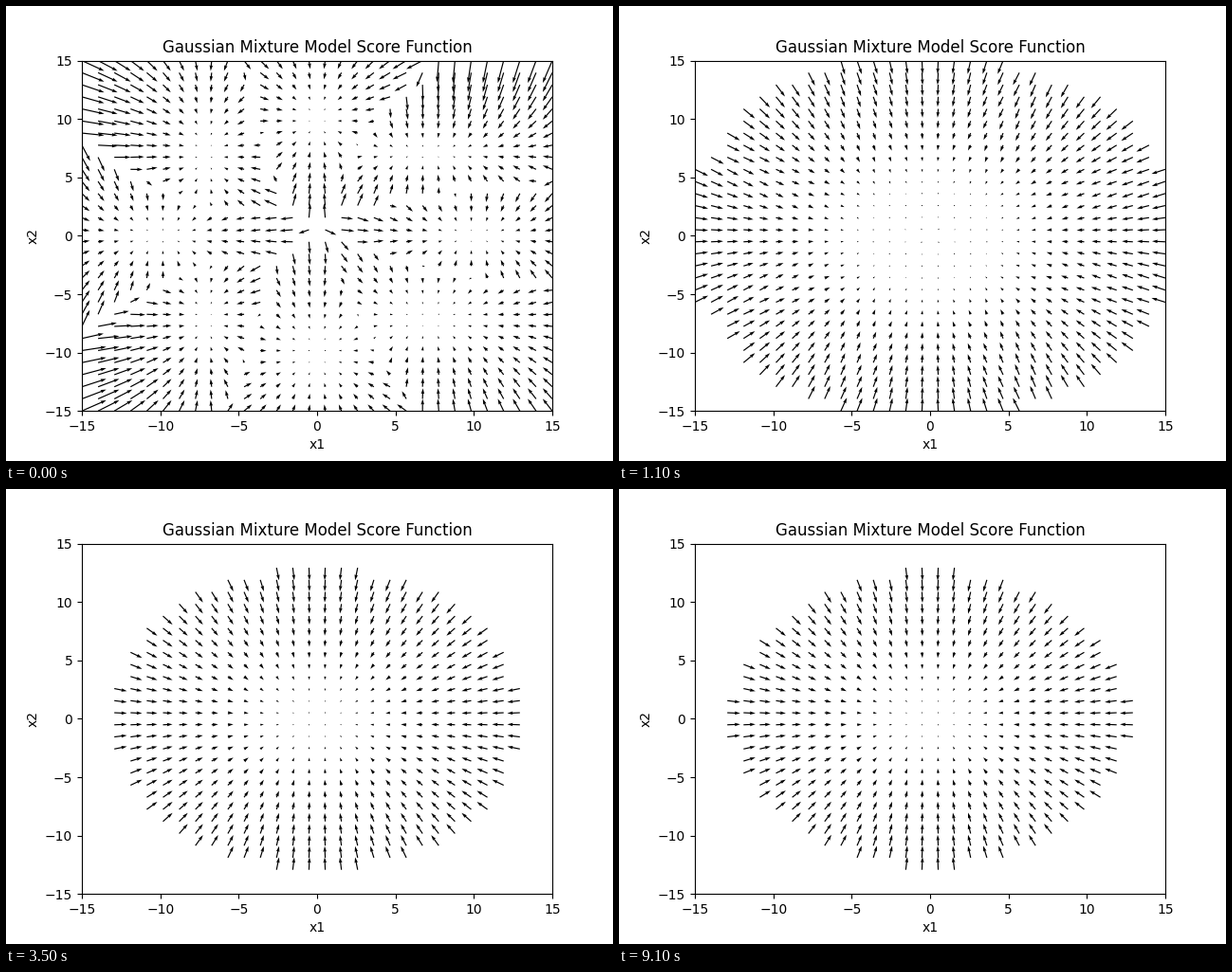
Recreate the animation shown at these times as a matplotlib script. Size 640 by 480 pixels, loop 9200 ms.

```python
import numpy as np
import matplotlib.pyplot as plt
from matplotlib.animation import FuncAnimation

FRAMES, INTERVAL = 92, 100
DECAY = 0.9          # shrink of the means per step
LOG_FLOOR = -88.376  # single-precision exp() underflows below this

# Eight components on a circle, counter-clockwise from the right
angles = np.arange(8) * np.pi / 4
means = 10 * np.column_stack([np.cos(angles), np.sin(angles)])
variances = np.array([
    (1.10, 0.70), (1.40, 0.60), (0.70, 1.00), (0.60, 1.30),
    (1.08, 0.80), (0.55, 1.25), (1.00, 1.30), (1.40, 1.10),
])

axis = np.linspace(-15, 15, 30)
X, Y = np.meshgrid(axis, axis)
points = np.stack([X, Y], axis=-1)[:, :, None, :]


def score(step):
    """Gradient of the log density after `step` noising steps."""
    a = DECAY ** step
    var = a * a * variances + 1 - a * a
    diff = points - a * means
    log_pdf = (-0.5 * (diff ** 2 / var).sum(-1)
               - np.log(2 * np.pi) - 0.5 * np.log(var.prod(-1)))
    pdf = np.where(log_pdf > LOG_FLOOR, np.exp(log_pdf), 0.0)
    total = pdf.sum(-1)
    grad = -(pdf[..., None] * diff / var).sum(2)
    with np.errstate(invalid="ignore", divide="ignore"):
        return grad / total[..., None]


fig, ax = plt.subplots(figsize=(6.4, 4.8), dpi=100)
ax.set_title("Gaussian Mixture Model Score Function")
ax.set_xlabel("x1")
ax.set_ylabel("x2")


def update(step):
    for old in list(ax.collections):
        old.remove()
    field = score(step)
    # A fresh quiver rescales its arrows to the current mean length
    arrows = ax.quiver(X, Y, field[..., 0], field[..., 1])
    ax.set_xlim(-15, 15)
    ax.set_ylim(-15, 15)
    return [arrows]


anim = FuncAnimation(fig, update, frames=FRAMES, interval=INTERVAL,
                     init_func=lambda: update(0), repeat=True,
                     repeat_delay=0, blit=False)
plt.show()
```
